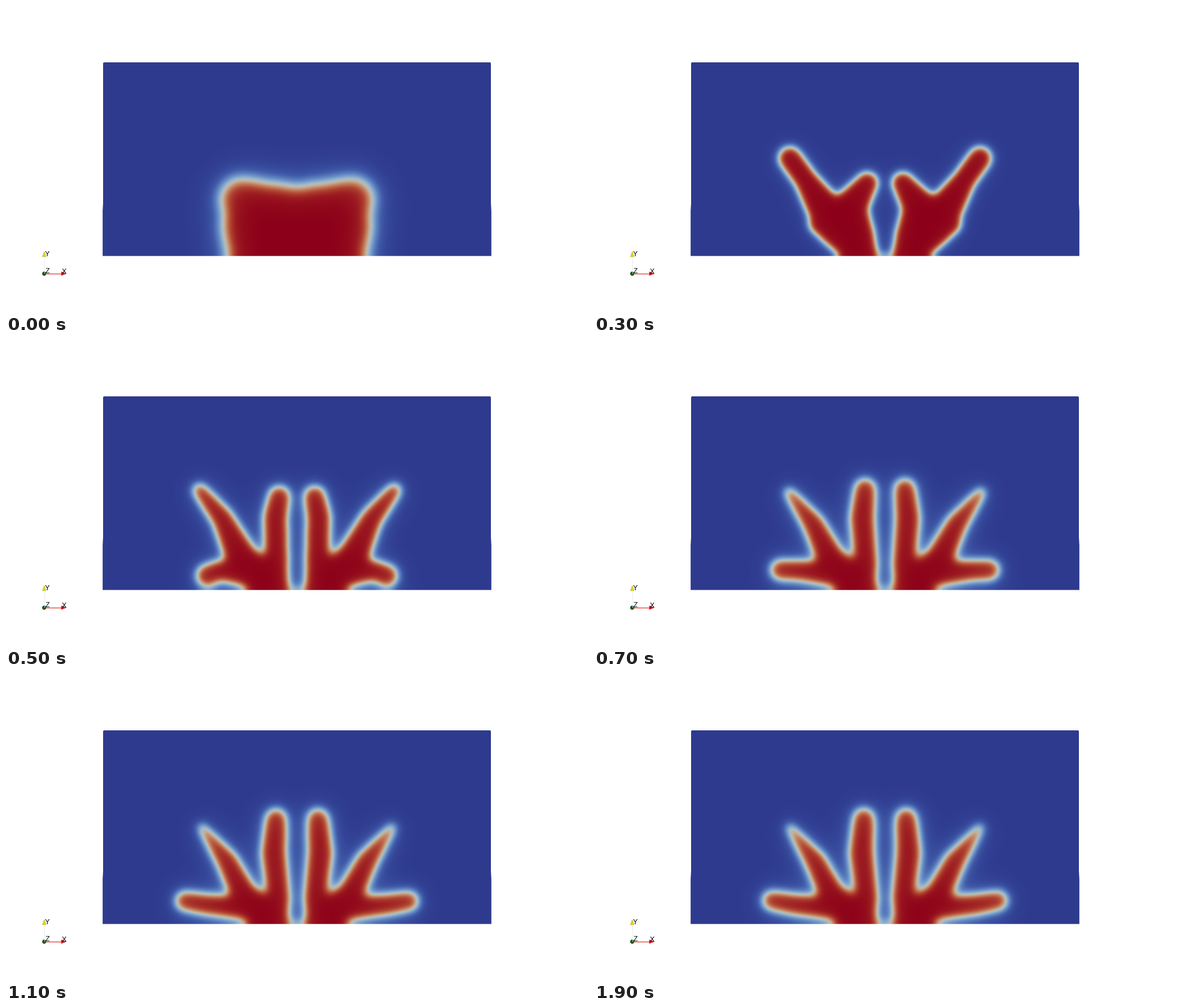
These frames come from a looping animation (1031x543 px, 2 s). A matplotlib script:

```python
import numpy as np
import matplotlib.pyplot as plt
from matplotlib.animation import FuncAnimation
from matplotlib.colors import LinearSegmentedColormap
from matplotlib.patches import Circle, Polygon

W, H, DPI = 1031, 543, 100
FRAMES, INTERVAL = 20, 100
LEFT, RIGHT, TOP, BOTTOM = 171, 860, 100, 444
MID = (LEFT + RIGHT) / 2

# Left half only. Each limb runs from the trunk over base and elbow to its
# tip; every joint is a disc (x, y, radius). Order: inner, outer, lower.
TRUNK = (470, 435, 32)
FLOOR = np.array([(480, 449, 8), (MID, 449, 8)])
BLOCK = [[(480, 395, 60), (478, 362, 48), (500, 353, 34)],
         [(430, 400, 42), (446, 351, 41), (416, 342, 38)],
         [(450, 440, 58), (430, 410, 44), (424, 390, 42)]]
HORNS = [[(472, 408, 26), (452, 360, 33), (484, 314, 20)],
         [(415, 370, 34), (374, 307, 21), (347, 270, 21)],
         [(455, 420, 30), (425, 395, 30), (404, 384, 24)]]
BRANCHES = [[(480, 395, 21), (477, 314, 22), (484, 278, 20)],
            [(418, 388, 29), (384, 318, 20), (343, 267, 13)],
            [(430, 412, 26), (378, 409, 18), (356, 418, 20)]]
FAN = [[(484, 400, 20), (474, 318, 23), (478, 257, 20)],
       [(422, 392, 23), (392, 333, 20), (347, 273, 7)],
       [(425, 416, 20), (355, 409, 19), (315, 402, 18)]]
POSES = np.array([BLOCK, HORNS, BRANCHES, FAN], float)

# edge blur, glow blur and share of the glow in each pose
SOFTNESS = np.array([(13, 32, .33), (7.3, 20, .15), (8, 22, .25),
                     (8.2, 23, .28)])

RAMP = {0: "#2e3a8e", .15: "#405aa8", .3: "#648ac4", .42: "#8eafcf",
        .5: "#b0bcc0", .58: "#c3b097", .68: "#c4805f", .8: "#af4330",
        .9: "#9c1b21", 1: "#8c0019"}
CMAP = LinearSegmentedColormap.from_list("heat", list(RAMP.items()), N=512)

cols = np.arange(LEFT, RIGHT) + .5
rows = np.arange(TOP, BOTTOM) + .5
X, Y = np.meshgrid(cols[cols <= MID], rows)


def progress(n):
    """Position along the poses: quick sprouting, then a settling tail."""
    if n <= 3:
        return np.sin(np.pi / 2 * n / 3)
    if n <= 5:
        return 1 + (n - 3) / 2
    return 3 - np.exp(-.5 * (n - 5))


def blend(items, p):
    i = min(int(p), len(items) - 2)
    return items[i] + (items[i + 1] - items[i]) * (p - i)


def bone(a, b):
    """Pixels inside a capsule tapering from disc a to disc b."""
    (ax, ay, ar), (bx, by, br) = a, b
    dx, dy = bx - ax, by - ay
    t = np.clip(((X - ax) * dx + (Y - ay) * dy) / (dx * dx + dy * dy), 0, 1)
    return np.hypot(X - ax - t * dx, Y - ay - t * dy) < ar + t * (br - ar)


def kernel(axis, sigma):
    k = np.exp(-.5 * ((axis[:, None] - axis) / sigma) ** 2)
    return k / (sigma * np.sqrt(2 * np.pi))


def blur(mask, sigma):
    """Gaussian blur that reflects at the bottom edge."""
    tall = np.vstack([mask, mask[:-101:-1]])
    axis = TOP + np.arange(len(tall)) + .5
    return kernel(axis, sigma)[:len(rows)] @ tall @ kernel(cols, sigma)


def field(n):
    p = progress(n)
    inside = bone(*FLOOR)
    for limb in blend(POSES, p):
        chain = [TRUNK, *limb]
        for a, b in zip(chain, chain[1:]):
            inside |= bone(a, b)
    mask = np.hstack([inside, inside[:, -2::-1]]).astype(float)
    edge, glow, share = blend(SOFTNESS, p)
    return (1 - share) * blur(mask, edge) + share * blur(mask, glow)


fig = plt.figure(figsize=(W / DPI, H / DPI), dpi=DPI, facecolor="white")
ax = fig.add_axes([0, 0, 1, 1])
ax.axis("off")
image = ax.imshow(field(0), cmap=CMAP, vmin=0, vmax=1, aspect="auto",
                  interpolation="nearest",
                  extent=(LEFT, RIGHT, BOTTOM, TOP))
ax.set_xlim(0, W)
ax.set_ylim(H, 0)
side = [(173.5, 99.8), (172, 101.5), (172, 350), (171.2, 364), (171.2, 443.6)]
plate = Polygon(side + [(2 * MID - x, y) for x, y in side[::-1]],
                transform=ax.transData)
image.set_clip_path(plate)

# orientation axes
ax.plot([67.7, 67.7], [475, 445], color="#e8e8e6", lw=.6)
ax.plot([68, 99], [475, 475], color="#d82020", lw=.8)
ax.add_patch(Polygon([(67.7, 436), (64.5, 445), (71, 445)], fc="#e0d816",
                     ec="#8c8710", lw=.3))
ax.add_patch(Polygon([(106.5, 475), (98, 471.7), (98, 478.3)], fc="#e01212",
                     ec="#a00c0c", lw=.3))
ax.add_patch(Circle((67.7, 475), 3.4, fc="#0a5a12", ec="#06400c", lw=.3))
for letter, x, y in (("Y", 73, 441), ("Z", 73.5, 470.5), ("X", 103, 472)):
    ax.text(x, y, letter, family="Liberation Sans", size=9, color="black",
            ha="center", va="center")


def update(n):
    image.set_data(field(n))
    return [image]


anim = FuncAnimation(fig, update, frames=FRAMES, interval=INTERVAL,
                     repeat=True, repeat_delay=0, blit=False)
plt.show()
```
